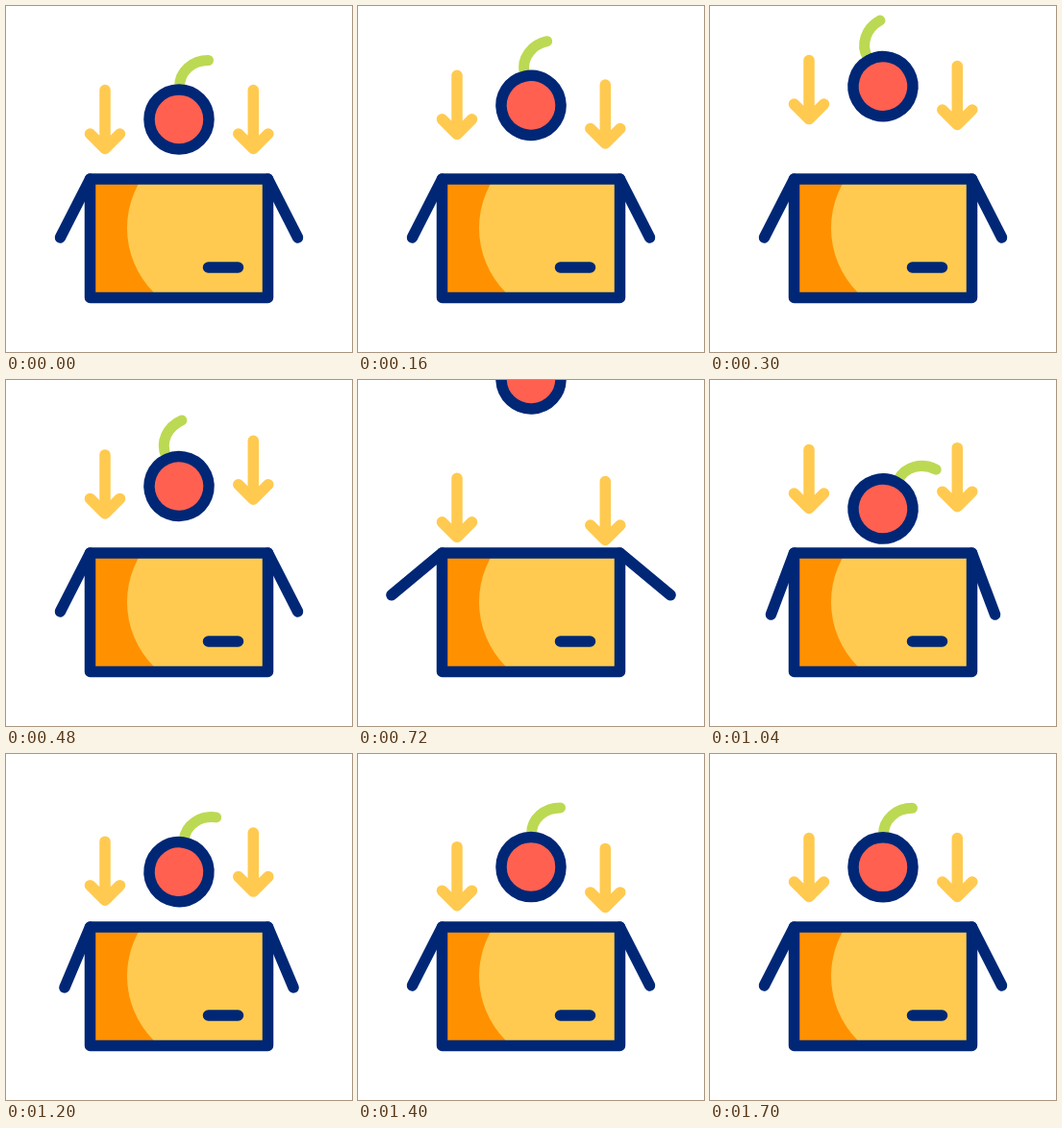
Write an HTML page that moves like this. It is 360 px wide and 360 px high and loops after 1.84 s.

```html
<!DOCTYPE html>
<html lang="en">
<head>
<meta charset="utf-8">
<title>Fruit into box</title>
<style>
  html, body { margin: 0; width: 100%; height: 100%; overflow: hidden; background: #fff; }
  svg { display: block; width: 100%; height: 100%; }
  .line { fill: none; stroke-width: 11.5; stroke-linecap: round; stroke-linejoin: round; }
  .navy { stroke: #002776; }
  .gold { stroke: #ffca4f; stroke-width: 11.5; }
  .leaf { stroke: #bcd953; stroke-width: 11; }
</style>
</head>
<body>
<svg viewBox="0 0 360 360">
  <defs>
    <clipPath id="inside"><rect x="87.5" y="180" width="185" height="123.5"/></clipPath>
    <path id="arrow" d="M0 87.5V148.5M-15.5 133L0 148.5L15.5 133"/>
  </defs>

  <g id="fruit">
    <path class="line leaf" d="M.5 -34C.5 -50 14 -61.5 30.5 -61.5"/>
    <circle r="31" fill="#ff6050" class="navy" stroke-width="11.5"/>
  </g>

  <g class="line gold">
    <use id="arrowL" href="#arrow"/>
    <use id="arrowR" href="#arrow"/>
  </g>

  <g clip-path="url(#inside)">
    <rect x="87" y="179" width="186" height="125" fill="#ff9100"/>
    <circle cx="221" cy="231" r="95" fill="#ffca4f"/>
  </g>
  <g class="line navy">
    <path id="flapL" d="M0 0V68.4"/>
    <path id="flapR" d="M0 0V68.4"/>
    <rect x="87.5" y="180" width="185" height="123.5"/>
    <path d="M210.5 272H241.5"/>
  </g>
</svg>
<script>
const LOOP = 1840, STEP = 20;
const PEAK = 375;       // top of the first hop
const SWAP = 620;       // one fruit is inside the box, the next drops from above
const REST_Y = 118, REST_FLAP = 27;
const ARROW_LAG = 70;

// Sine-eased swing through evenly timed turning points, holding both ends
function swing(points, beat, t) {
  const u = Math.min(Math.max(t / beat, 0), points.length - 1);
  const i = Math.min(Math.floor(u), points.length - 2);
  const ease = (1 - Math.cos(Math.PI * (u - i))) / 2;
  return points[i] + (points[i + 1] - points[i]) * ease;
}

// Damped spring offset that starts at amp and settles at 0
const settle = (amp, decay, halfPeriod, t) =>
  amp * Math.exp(-t / decay) * Math.cos(Math.PI * t / halfPeriod);

// Hop up tilting left, then fall under gravity
function hop(t) {
  const fall = (Math.max(t - PEAK, 0) / 105) ** 2;
  return {
    y: swing([REST_Y, 80], PEAK, t) + 30.5 * fall,
    turn: swing([0, -32], PEAK, t) + 8 * fall
  };
}

// Drop in from above, overshoot and come to rest
const drop = t => ({
  y: REST_Y + settle(-295, 148, 480, t),
  turn: swing([-10, 30, 0], 350, t)
});

const arrowShift = t => swing([0, -31.5, 18, -17, 11, 0], 328, t);
const flapAngle = t => swing([REST_FLAP, 59.5, 19, REST_FLAP], 260, t - 553);

const place = (id, x, y, turn = 0) =>
  document.getElementById(id).setAttribute('transform', `translate(${x} ${y}) rotate(${turn})`);

function draw(t) {
  const fruit = t < SWAP ? hop(t) : drop(t - SWAP);
  place('fruit', 180, fruit.y, fruit.turn);
  place('arrowL', 103, arrowShift(t));
  place('arrowR', 257.3, arrowShift(t - ARROW_LAG));
  const open = flapAngle(t);
  place('flapL', 87.5, 180, open);
  place('flapR', 272.5, 180, -open);
}

const start = performance.now();
function tick() {
  const t = (performance.now() - start) % LOOP;
  draw(Math.floor(t / STEP) * STEP);
  requestAnimationFrame(tick);
}
draw(0);
requestAnimationFrame(tick);
</script>
</body>
</html>
```
